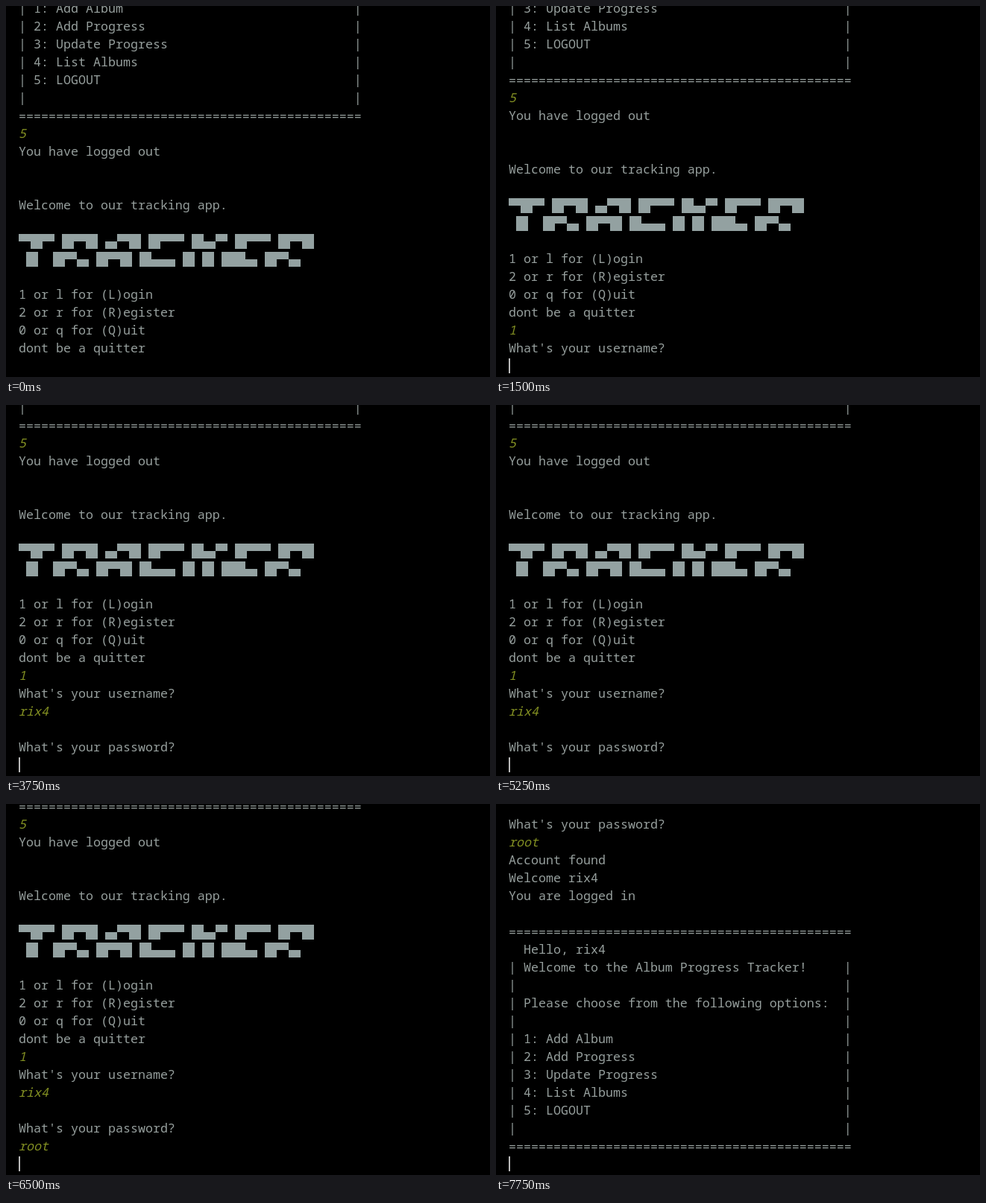
Write an HTML page that moves like this. It is 649 by 498 pixels and loops after 8 s.

```html
<!DOCTYPE html>
<html lang="en">
<head>
<meta charset="utf-8">
<title>Tracker terminal</title>
<style>
html, body { margin: 0; width: 100%; height: 100%; overflow: hidden; background: #000; }
body { position: relative; }
#screen {
  position: absolute; left: 17px; bottom: 3px;
  font: 16.667px/24px "Noto Sans Mono", monospace;
  font-variant-ligatures: none;
  white-space: pre; color: #969f9d;
}
#screen div { height: 24px; }
#screen .rule { position: relative; top: 1px; }
.typed { color: #828f22; font-style: italic; }
.block { display: inline-block; width: 16px; vertical-align: top; background: #93a1a1; }
#cursor { position: absolute; bottom: 2px; width: 2px; height: 20px; background: #bbb; }
</style>
</head>
<body>
<div id="screen"></div>
<script>
const LOOP = 8000;
const user = 'rix4', password = 'root';
const rule = '='.repeat(46);
const boxed = text => '| ' + text.padEnd(43) + '|';

// A leading ">" marks a line typed by the user.
const menu = [
  rule,
  `  Hello, ${user}`,
  ...['Welcome to the Album Progress Tracker!', '',
    'Please choose from the following options:', '',
    '1: Add Album', '2: Add Progress', '3: Update Progress',
    '4: List Albums', '5: LOGOUT', ''].map(boxed),
  rule
];

const output = [
  [0, [...menu, '>5', 'You have logged out', '', '',
    'Welcome to our tracking app.', '',
    '▀█▀ █▀█ ▄▀█ █▀▀ █▄▀ █▀▀ █▀█',
    ' █  █▀▄ █▀█ █▄▄ █ █ ██▄ █▀▄', '',
    '1 or l for (L)ogin', '2 or r for (R)egister',
    '0 or q for (Q)uit', 'dont be a quitter']],
  [1500, ['>1', "What's your username?"]],
  [3750, ['>' + user, '', "What's your password?"]],
  [6500, ['>' + password]],
  [6750, ['Account found', `Welcome ${user}`, 'You are logged in', '', ...menu]]
];

const input = [
  [0, ''], [750, '1'], [1500, ''],
  [2750, user.slice(0, 2)], [3000, user.slice(0, 3)], [3500, user], [3750, ''],
  [5500, password.slice(0, 1)], [5750, password.slice(0, 3)], [6000, password], [6500, '']
];

const cursorOff = [[0, 500], [2250, 2750], [4750, 5250], [7250, 7750]];

const block = c => `<span class="block" style="margin-top:${c === '▄' ? 13 : 3}px;height:${c === '█' ? 20 : 10}px"></span>`;

const row = text => {
  if (text[0] === '>') return `<div class="typed">${text.slice(1)}</div>`;
  if (text === rule) return `<div class="rule">${text}</div>`;
  return `<div>${text.replace(/[▀▄█]/g, block)}</div>`;
};

const screenEl = document.getElementById('screen');
let shown = '';

function draw() {
  const t = performance.now() % LOOP;
  const past = ([start]) => start <= t;
  const lines = output.filter(past).flatMap(([, text]) => text);
  const typing = input.filter(past).pop()[1];
  const hidden = cursorOff.some(([from, to]) => t >= from && t < to);
  const left = Math.max(0, typing.length * 10 - 1);
  const html = [...lines, '>' + typing].map(row).join('') +
    (hidden ? '' : `<span id="cursor" style="left:${left}px"></span>`);
  if (html !== shown) screenEl.innerHTML = shown = html;
  requestAnimationFrame(draw);
}
draw();
</script>
</body>
</html>
```
